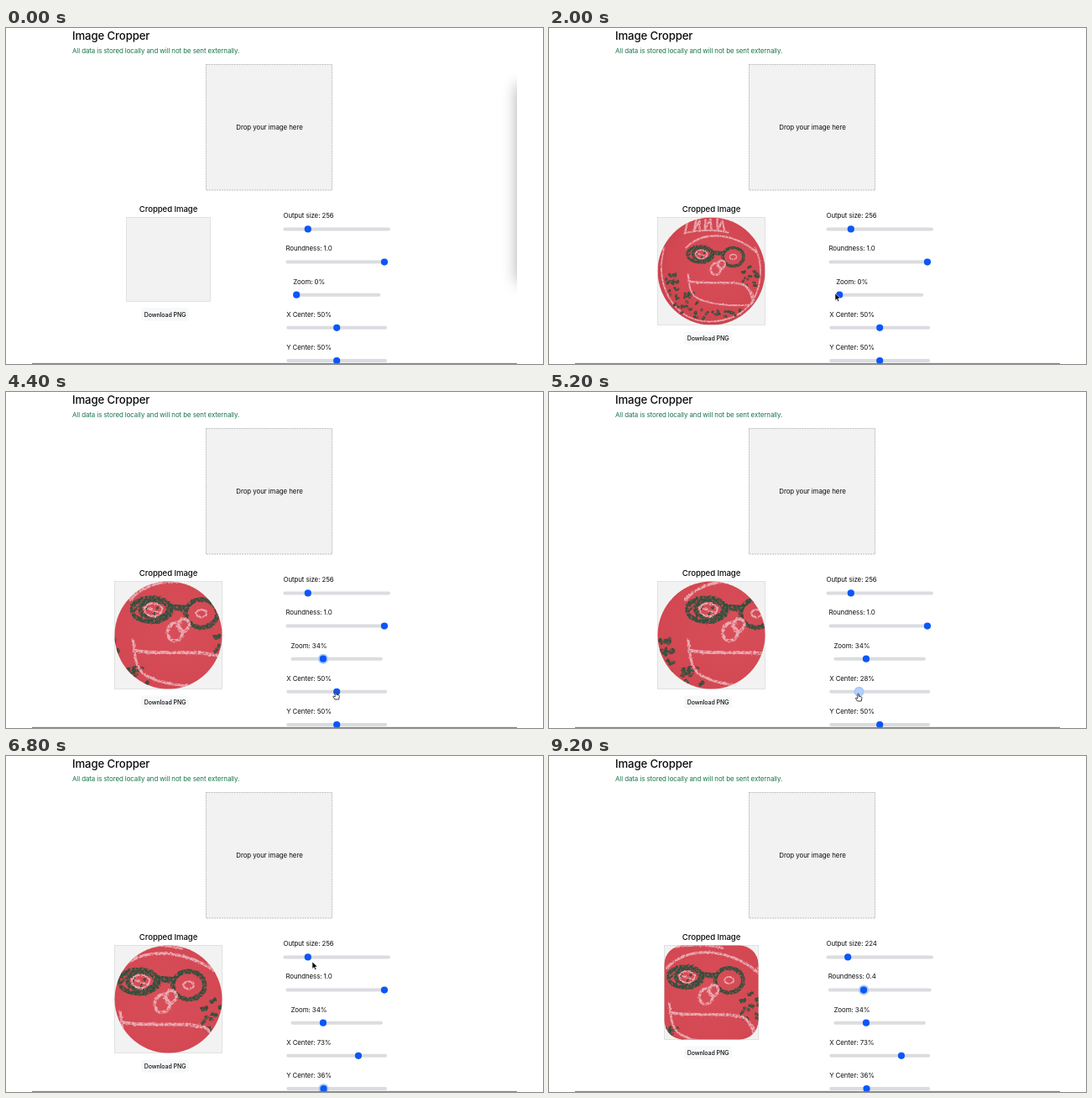
Write an HTML page that moves like this. It is 640x400 px and loops after 9600 ms.

```html
<!DOCTYPE html>
<html lang="en">
<head>
<meta charset="utf-8">
<title>Image Cropper</title>
<style>
html, body { margin: 0; width: 100%; height: 100%; overflow: hidden; background: #fff; }
svg { display: block; }
text { font: 400 7.9px Inter, Roboto, sans-serif; letter-spacing: -.009em; fill: #0c0d0e; }
.mid { text-anchor: middle; }
.h1 { font-size: 13.2px; font-weight: 500; }
.h2 { font-size: 9.6px; font-weight: 500; }
.btn { font-size: 7px; font-weight: 500; }
.note { fill: #157347; }
.track { fill: #dadce0; }
.chalk { fill: none; stroke: #ecaab3; stroke-width: 2.2; stroke-linecap: round; stroke-linejoin: round; }
.green { fill: none; stroke: #344f3c; stroke-width: 3; stroke-linecap: round; }
</style>
</head>
<body>
<svg id="stage" width="640" height="400" viewBox="0 0 640 400">
  <defs>
    <radialGradient id="red" cx=".55" cy=".45" r=".65">
      <stop offset="0" stop-color="#d84e58"/>
      <stop offset=".7" stop-color="#d24751"/>
      <stop offset="1" stop-color="#c0404a"/>
    </radialGradient>
    <filter id="crayon" filterUnits="userSpaceOnUse" x="0" y="0" width="128" height="128">
      <feTurbulence type="fractalNoise" baseFrequency=".5" numOctaves="2" seed="4" result="n"/>
      <feDisplacementMap in="SourceGraphic" in2="n" scale="2" xChannelSelector="R" yChannelSelector="G" result="d"/>
      <feColorMatrix in="n" values="0 0 0 0 0  0 0 0 0 0  0 0 0 0 0  0 0 0 2.4 -.3" result="grain"/>
      <feComposite in="d" in2="grain" operator="in"/>
      <feGaussianBlur stdDeviation=".35"/>
    </filter>
    <filter id="soft" x="-100%" y="-20%" width="300%" height="140%"><feGaussianBlur stdDeviation="9"/></filter>
    <clipPath id="edge"><rect width="609" height="400"/></clipPath>
    <clipPath id="disc"><circle cx="64" cy="64" r="64"/></clipPath>
    <clipPath id="crop"><rect id="cropRect" y="225.5"/></clipPath>
    <g id="art">
      <rect width="128" height="128" fill="url(#red)"/>
      <g filter="url(#crayon)">
        <g class="chalk">
          <path d="M8 36C-2 70 10 103 36 118C60 130 98 124 114 98C125 78 125 54 116 36" stroke-width="1.8"/>
          <path d="M36 3L33 17M46 3L43 16L50 4L50 16M57 3L56 15L63 2L64 15M71 2L71 16L77 4L80 16" stroke-width="2.4"/>
          <path d="M32 19C45 15 72 14 84 18"/>
          <path d="M34 36C44 25 58 21 74 22C92 24 108 32 118 42"/>
        </g>
        <g class="green">
          <ellipse cx="51" cy="44" rx="15.5" ry="9.5" stroke-width="3.4"/>
          <ellipse cx="53" cy="43.5" rx="11" ry="7" stroke-width="3.4"/>
          <ellipse cx="90" cy="47" rx="12.5" ry="11" stroke-width="3.6"/>
          <path d="M65 41L79 42M67 43L78 44" stroke-width="3"/>
          <path d="M36 46L44 38M42 51L49 38M50 51L58 39M58 51L65 43" stroke-width="1.6"/>
          <path id="beard"/>
        </g>
        <g class="chalk">
          <path d="M45 44C46 37 58 37 59 44C58 51 47 51 45 44M48 43L57 46M86 47a4 3 0 1 0 8 0a4 3 0 1 0-8 0" stroke-width="1.5"/>
          <path d="M74 54C63 52 60 65 67 68C75 70 78 60 71 57M72 54C74 49 82 51 80 57C78 63 72 62 72 56" stroke-width="2.5"/>
          <path d="M36 67C38 78 37 87 44 94C58 104 90 106 110 104C117 101 115 94 111 88" stroke-width="2"/>
          <path d="M37 76C58 80 84 75 102 80C109 83 111 91 114 100" stroke-width="2.5"/>
        </g>
      </g>
    </g>
  </defs>

  <rect width="640" height="400" fill="#fff"/>
  <g id="shade" clip-path="url(#edge)"><rect x="609" y="68" width="40" height="234" fill="#888" opacity=".7" filter="url(#soft)"/></g>
  <text class="h1" x="79" y="14">Image Cropper</text>
  <text class="note" x="79" y="30">All data is stored locally and will not be sent externally.</text>
  <rect x="238.5" y="43.5" width="150" height="149.5" fill="#f2f2f2" stroke="#bcbcbc" stroke-dasharray="2 1"/>
  <text class="mid" x="314" y="121">Drop your image here</text>
  <text class="h2 mid" x="193.5" y="219">Cropped Image</text>
  <rect id="frame" y="225.5" fill="#f2f2f2" stroke="#d6d7d8" stroke-width=".7"/>
  <g id="shown" clip-path="url(#crop)"><use id="view" href="#art"/></g>
  <g id="button">
    <rect x="161" y="8" width="57" height="15" rx="2" fill="#f7f8f9"/>
    <text class="btn mid" x="189.5" y="18">Download PNG</text>
  </g>
  <g id="rows"></g>
  <path d="M31 399.4H609" stroke="#777" stroke-width="1"/>
  <g id="ghost" transform="translate(425 92) scale(.5)" opacity=".6"><use href="#art" clip-path="url(#disc)"/></g>
  <path id="arrow" d="M0 0V8.4L2 6.6L3.4 9.6L4.9 8.9L3.5 6L6.2 5.8Z" fill="#000" stroke="#fff" stroke-width=".6"/>
  <path id="hand" d="M-.8 4.6V.6Q0-.6.8.6V3.2L3.8 4Q4.5 4.4 4.3 5.6L3.6 9H-1L-3.2 5.8Q-3 4.6-1.8 5.3L-.8 6Z" fill="#fff" stroke="#111" stroke-width=".8" stroke-linejoin="round"/>
</svg>
<script>
const $ = id => document.getElementById(id);
const set = (el, attrs) => { for (const k in attrs) el.setAttribute(k, attrs[k]); return el; };
const add = (parent, tag, attrs) =>
  parent.appendChild(set(document.createElementNS("http://www.w3.org/2000/svg", tag), attrs));
const show = (el, on) => el.style.display = on ? "" : "none";

const STEP = 400;
const start = {
  size: 256, round: 1, zoom: 0, x: 50, y: 50,
  loaded: false, shade: true, ghost: false,
  cursor: "", at: [0, 0], held: "", focus: ""
};
const steps = [
  {},
  { ghost: true, cursor: "arrow", at: [457, 124] },
  { ghost: false, loaded: true, at: [372, 128] },
  { shade: false, at: [362, 160] },
  { at: [346, 270] },
  { at: [341, 316] },
  {},
  {},
  { cursor: "hand", at: [344, 313], held: "zoom" },
  { zoom: 10, at: [353, 316] },
  { zoom: 34, at: [377, 318] },
  { held: "", focus: "zoom", at: [393, 357] },
  { x: 38, held: "x", focus: "", at: [380, 358] },
  { x: 28, at: [368.6, 359] },
  { x: 54, at: [398, 359] },
  { x: 73, at: [419, 359] },
  { y: 36, held: "y", at: [378, 391] },
  { held: "", focus: "y", cursor: "arrow", at: [365, 245] },
  { held: "size", focus: "", cursor: "hand", at: [359, 243] },
  { size: 224, at: [356.5, 244] },
  { held: "", focus: "size", cursor: "arrow", at: [410, 261] },
  { round: .8, held: "round", focus: "", cursor: "hand", at: [424, 280] },
  { round: .5, at: [387, 280] },
  { round: .4, held: "", focus: "round", cursor: "" }
];
const states = [];
steps.reduce((prev, s) => states[states.length] = { ...prev, ...s }, start);

// Label, slider width and thumb fraction for each control.
const controls = {
  size: { label: v => `Output size: ${v}`, width: () => 127.5, part: v => (v - 32) / 1056 },
  round: { label: v => `Roundness: ${v.toFixed(1)}`, width: v => v === 1 ? 121.5 : 123, part: v => (v - .1) / .9 },
  zoom: { label: v => `Zoom: ${v}%`, width: v => v < 10 ? 104 : 109.5, part: v => v / 100 },
  x: { label: v => `X Center: ${v}%`, width: () => 120, part: v => v / 100 },
  y: { label: v => `Y Center: ${v}%`, width: () => 120, part: v => v / 100 }
};
Object.values(controls).forEach((c, i) => {
  const cy = 239.4 + 39.15 * i;
  c.text = add($("rows"), "text", { y: cy - 13.2 });
  c.track = add($("rows"), "rect", { y: cy - 2, height: 4, rx: 2, class: "track" });
  c.halo = add($("rows"), "circle", { cy, r: 6, fill: "#a9c8fb" });
  c.thumb = add($("rows"), "circle", { cy, r: 4.1 });
});

let seed = 11;
const rand = () => (seed = seed * 16807 % 2147483647) / 2147483647;
const dabs = (n, cx, cy, rx, ry) => Array.from({ length: n }, () => {
  const a = rand() * 6.28, r = Math.sqrt(rand());
  const x = cx + rx * r * Math.cos(a), y = cy + ry * r * Math.sin(a);
  return `M${x.toFixed(1)} ${y.toFixed(1)}l${(rand() * 4 - 1).toFixed(1)} ${(rand() * 3 - 2).toFixed(1)}`;
}).join("");
$("beard").setAttribute("d",
  dabs(18, 110, 71, 11, 13) + dabs(18, 17, 78, 7, 16) + dabs(22, 33, 102, 14, 13) + dabs(12, 58, 115, 18, 6) + dabs(8, 90, 115, 12, 5));

function draw(s) {
  show($("shade"), s.shade);
  show($("ghost"), s.ghost);
  show($("shown"), s.loaded);

  const w = s.loaded ? s.size / 2 : 100, left = 193.5 - w / 2;
  set($("frame"), { x: left, width: w, height: w });
  set($("cropRect"), { x: left, width: w, height: w, rx: s.round * w / 2 });
  const z = s.zoom / 100, k = w / 128 / (1 - z);
  const dx = left - s.x / 100 * z * 128 * k, dy = 225.5 - s.y / 100 * z * 128 * k;
  set($("view"), { transform: `translate(${dx} ${dy}) scale(${k})` });
  set($("button"), { transform: `translate(0 ${225.5 + w})` });

  for (const key in controls) {
    const c = controls[key], v = s[key], width = c.width(v);
    const x = 394.2 - width / 2, cx = x + 4 + (width - 8) * c.part(v);
    const held = s.held === key;
    c.text.textContent = c.label(v);
    set(c.text, { x });
    set(c.track, { x, width });
    set(c.halo, { cx });
    set(c.thumb, { cx, fill: held ? "#b6d0fd" : "#0b57f7" });
    show(c.halo, held || s.focus === key);
  }
  for (const kind of ["arrow", "hand"]) {
    show($(kind), s.cursor === kind);
    set($(kind), { transform: `translate(${s.at})` });
  }
}

let last = -1;
const t0 = performance.now();
function tick(now) {
  const i = Math.floor(Math.max(0, now - t0) / STEP) % states.length;
  if (i !== last) draw(states[last = i]);
  requestAnimationFrame(tick);
}
tick(t0);
</script>
</body>
</html>
```
